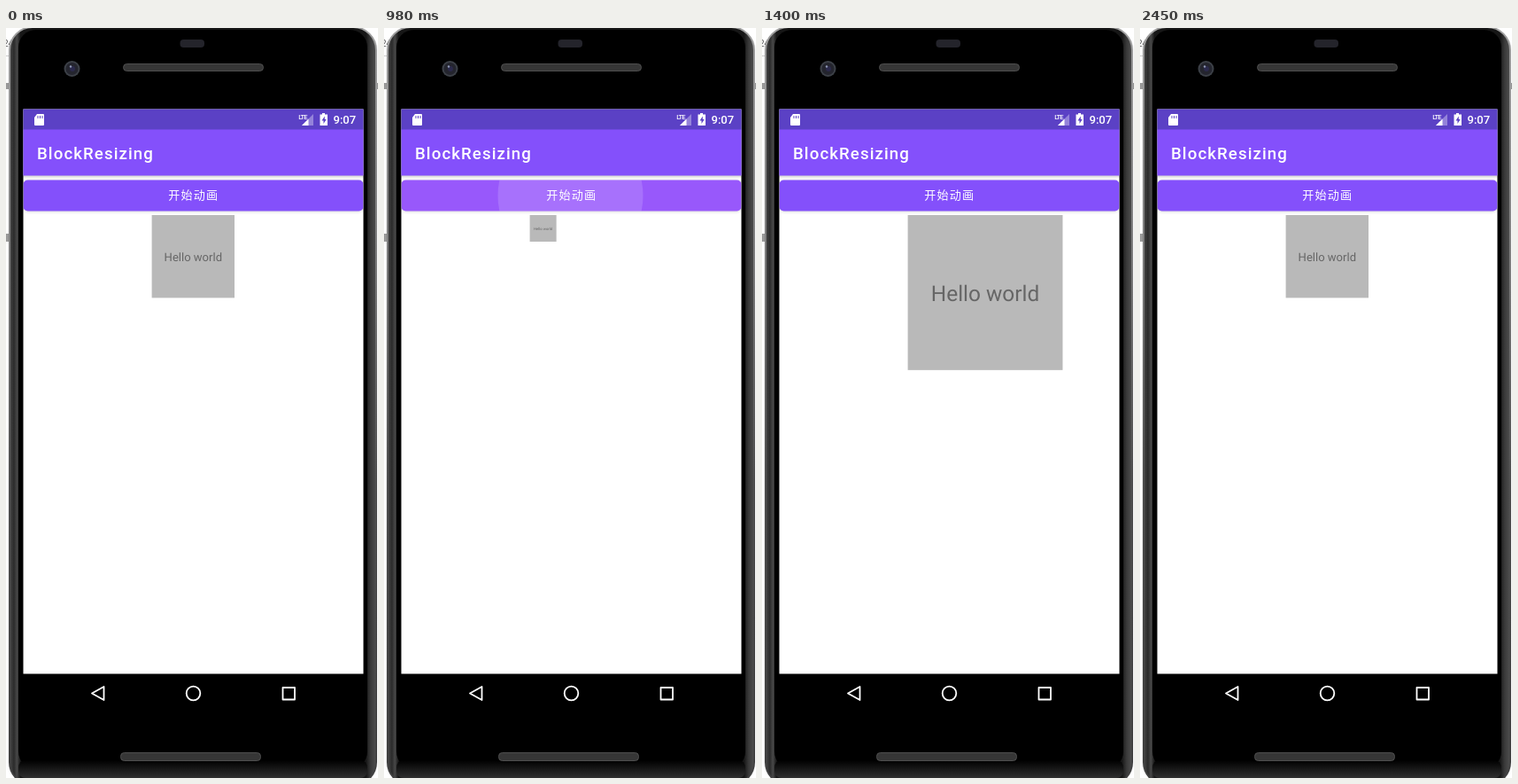
Recreate the animation shown at these times as an HTML page. Size 420 px wide and 846 px high, loop 2.52 s.

```html
<!DOCTYPE html>
<html lang="zh">
<head>
<meta charset="utf-8">
<title>Block scaling</title>
<style>
  html, body { margin: 0; width: 100%; height: 100%; overflow: hidden; background: #fff; }
  svg { display: block; width: 100vw; height: 100vh; }
  text { font-family: Roboto, "Noto Sans CJK SC", "Noto Sans CJK", sans-serif; }
  .label { font-family: "Noto Sans CJK SC", "Noto Sans CJK", sans-serif; letter-spacing: 1.17px; }
  .medium { font-weight: 500; }
  .title { letter-spacing: 1.1px; }
</style>
</head>
<body>
<svg viewBox="0 0 420 846" preserveAspectRatio="none">
  <defs>
    <linearGradient id="rim">
      <stop offset="0" stop-color="#484848"/>
      <stop offset=".012" stop-color="#2b2b2b"/>
      <stop offset=".02" stop-color="#484848"/>
      <stop offset=".03" stop-color="#161616"/>
      <stop offset=".972" stop-color="#161616"/>
      <stop offset=".984" stop-color="#383838"/>
      <stop offset="1" stop-color="#505050"/>
    </linearGradient>
    <linearGradient id="edge" x2="0" y2="1">
      <stop offset="0" stop-color="#a0a0a0"/>
      <stop offset=".3" stop-color="#808080"/>
      <stop offset=".6" stop-color="#505050"/>
      <stop offset="1" stop-color="#404040"/>
    </linearGradient>
    <linearGradient id="chin" x2="0" y2="1">
      <stop offset="0" stop-color="#000"/>
      <stop offset="1" stop-color="#303030"/>
    </linearGradient>
    <linearGradient id="barShade" x2="0" y2="1">
      <stop offset="0" stop-color="#000" stop-opacity=".2"/>
      <stop offset="1" stop-color="#000" stop-opacity="0"/>
    </linearGradient>
    <filter id="blur" x="-10%" y="-60%" width="120%" height="220%"><feGaussianBlur stdDeviation="2"/></filter>
    <clipPath id="screen"><rect x="19.500" y="91.500" width="384" height="637"/></clipPath>
    <clipPath id="buttonClip"><rect x="19.500" y="171.500" width="384" height="35" rx="5"/></clipPath>
  </defs>

  <!-- phone -->
  <g fill="#999">
    <rect y="62" width="5" height="7"/>
    <rect y="232" width="6" height="9"/>
    <rect x="415" y="62" width="5" height="7"/>
    <rect y="31" width="5" height="1" fill="#ccc"/>
  </g>
  <text x="-3" y="21" font-size="10" fill="#555">24</text>
  <rect x="4" y="-1" width="414" height="855" rx="26" fill="url(#rim)" stroke="url(#edge)" stroke-width="2"/>
  <rect x="14" y="2" width="394" height="834" rx="20" fill="#000"/>
  <rect x="14" y="826" width="394" height="20" rx="8" fill="url(#chin)"/>
  <rect x="196.500" y="13" width="27.500" height="9" rx="4" fill="#24242b"/>
  <g fill="#363636" stroke="#4e4e4e">
    <rect x="132.500" y="40.500" width="158" height="8" rx="4"/>
    <rect x="129.500" y="817.500" width="158" height="9" rx="4"/>
  </g>
  <circle cx="74.500" cy="46" r="9" fill="#3c4047"/>
  <circle cx="74.500" cy="46" r="7" fill="#24252e"/>
  <circle cx="75" cy="46" r="3" fill="#2b2a4c"/>
  <circle cx="73" cy="43.500" r="1.200" fill="#9098b5"/>

  <g clip-path="url(#screen)">
    <rect x="19" y="91" width="385" height="638" fill="#fff"/>
    <rect x="19" y="166" width="385" height="4" fill="url(#barShade)"/>

    <g id="box">
      <rect width="93.400" height="93.400" fill="#b9b9b9"/>
      <text x="46.700" y="51.800" font-size="13.050" text-anchor="middle" fill="#666" text-rendering="geometricPrecision">Hello world</text>
    </g>

    <rect id="shadow" x="20" width="383" height="34" rx="5" filter="url(#blur)"/>
    <g clip-path="url(#buttonClip)">
      <rect id="button" x="19" y="171" width="385" height="36"/>
      <circle id="ripple" cx="210.500" cy="189" fill="#fff"/>
    </g>
    <text class="label" x="183.300" y="193" font-size="13.050" fill="#fff">开始动画</text>

    <rect x="19" y="91" width="385" height="24" fill="#5b41c5"/>
    <rect x="19" y="114.500" width="385" height="52" fill="#8450fb"/>
    <text class="medium title" x="35" y="147.500" font-size="18.640" fill="#fff">BlockResizing</text>

    <!-- status icons -->
    <path d="M35 97h7q1 0 1 1v11q0 1-1 1h-9q-1 0-1-1v-8z" fill="#fff"/>
    <path d="M36 99v3M38.500 99v3M41 99v3" stroke="#5b41c5"/>
    <path d="M347 97v13h-13z" fill="#fff" opacity=".35"/>
    <path d="M341.500 102.500v7.500h-7.500z" fill="#fff"/>
    <text class="medium" x="330.300" y="103" font-size="7.500" letter-spacing="-1" fill="#fff">LTE</text>
    <path d="M357 96h3v1.500h3v12.500h-8.500V97.500h2.500z" fill="#fff"/>
    <path d="M359.800 99.500l-3.300 5h2v3.500l3.200-5h-1.900z" fill="#5b41c5"/>
    <text class="medium" x="369.500" y="108" font-size="13.050" fill="#fff">9:07</text>
  </g>

  <!-- navigation -->
  <g fill="none" stroke="#fff" stroke-width="1.800" stroke-linejoin="round">
    <path d="M97 750.500l13.500-7.500v15z"/>
    <circle cx="211.500" cy="750.500" r="7.800"/>
    <rect x="312.500" y="744" width="13.500" height="13.500"/>
  </g>
</svg>
<script>
  const LOOP = 2520, STEP = 70;
  const GROW = { start: 788, length: 731, peak: 2 };
  // [time, value] pairs
  const LIFT = [[560, 0], [700, 1], [840, 1], [980, 0]];
  const GLOW = [[630, 0], [770, .3], [980, 1], [1050, .9], [1260, .1], [1330, 0]];
  const FADE = [[770, 0], [840, .15], [1050, .15], [1260, 0]];

  const $ = id => document.getElementById(id);
  const box = $('box'), shadow = $('shadow'), button = $('button'), ripple = $('ripple');
  const mix = (a, b, k) => a + (b - a) * k;
  const clamp = v => Math.min(1, Math.max(0, v));

  function track(points, t) {
    const i = points.findIndex(p => p[0] > t);
    if (i < 0) return points[points.length - 1][1];
    if (i === 0) return points[0][1];
    const [t0, a] = points[i - 1], [t1, b] = points[i];
    return mix(a, b, (t - t0) / (t1 - t0));
  }

  function boxScale(t) {
    if (t < 770 || t >= GROW.start + GROW.length) return 1;
    const k = clamp((t - GROW.start) / GROW.length);
    return GROW.peak * (1 - Math.cos(Math.PI * k)) / 2;
  }

  function draw(t) {
    box.setAttribute('transform', `translate(164.6 211) scale(${boxScale(t)})`);

    const lift = track(LIFT, t);
    shadow.setAttribute('y', mix(172.5, 174.5, lift));
    shadow.setAttribute('opacity', mix(.22, .38, lift));

    const glow = track(GLOW, t);
    const rgb = [[132, 152], [80, 88], [251, 251]].map(([a, b]) => Math.round(mix(a, b, glow)));
    button.setAttribute('fill', `rgb(${rgb})`);

    ripple.setAttribute('r', Math.max(0, (t - 770) * 82 / 210));
    ripple.setAttribute('opacity', track(FADE, t));
  }

  const origin = performance.now();
  function tick() {
    const t = (performance.now() - origin) % LOOP;
    draw(Math.floor(t / STEP) * STEP);
    requestAnimationFrame(tick);
  }
  draw(0);
  requestAnimationFrame(tick);
</script>
</body>
</html>
```
